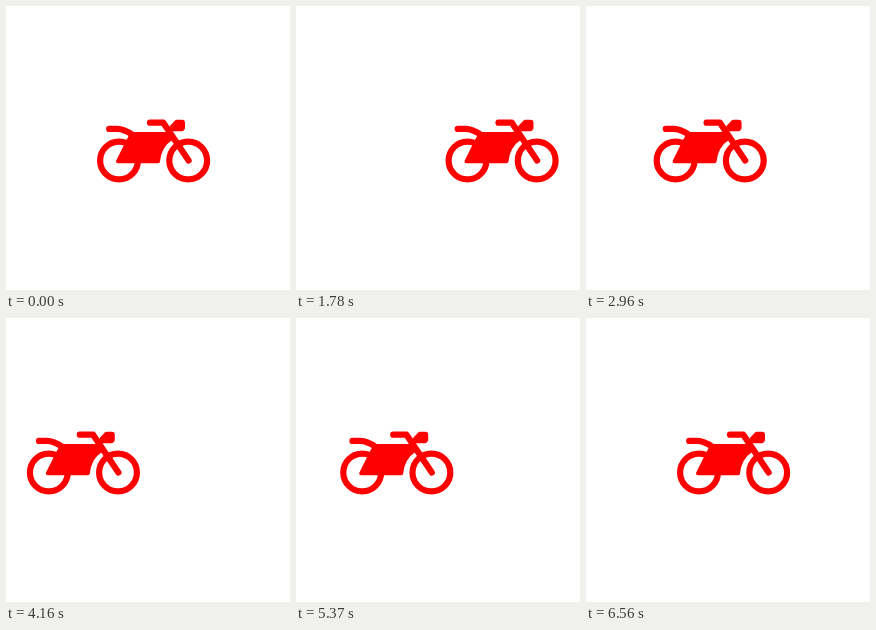
Recreate the animation shown at these times as an HTML page with a canvas. Size 284x284 px, loop 6630 ms.

```html
<!DOCTYPE html>
<html lang="en">
<head>
<meta charset="utf-8">
<title>Motorbike</title>
<style>
html, body { margin: 0; width: 100%; height: 100%; overflow: hidden; background: #fff; }
canvas { display: block; width: 284px; height: 284px; }
</style>
</head>
<body>
<canvas id="stage"></canvas>
<script>
const SIZE = 284, LOOP = 6630, STEP = 11.7, RED = '#ff0000';
const canvas = document.getElementById('stage');
const ratio = window.devicePixelRatio || 1;
canvas.width = canvas.height = Math.round(SIZE * ratio);
const ctx = canvas.getContext('2d');

// Moments at which the bike jumps one step to the right or left.
const hops = [
  [1, [260, 460, 660, 860, 1060, 1190, 1450]],
  [-1, [1580, 1780, 2040, 2240, 2370, 2500, 2700, 2830, 2960,
        3160, 3560, 3760, 4160, 4360, 4490]],
  [1, [4690, 4890, 5020, 5370, 5500, 5700, 6030, 6100, 6300]],
  [-1, [6560]]
];

function offsetAt(time) {
  let steps = 0;
  for (const [dir, times] of hops) {
    steps += dir * times.filter(t => t <= time).length;
  }
  return steps * STEP;
}

function wheel(x) {
  ctx.beginPath();
  ctx.arc(x, 154.5, 18.9, 0, Math.PI * 2);
  ctx.stroke();
}

function shape(d, filled) {
  const path = new Path2D(d);
  if (filled) ctx.fill(path);
  ctx.stroke(path);
}

function drawBike() {
  ctx.strokeStyle = ctx.fillStyle = RED;
  ctx.lineCap = ctx.lineJoin = 'round';
  ctx.lineWidth = 6.2;
  wheel(113);
  wheel(182.2);
  // Seat, then handlebar with fork
  shape('M103.2 122.9 H111 C117 122.9 121 125 126.5 129');
  shape('M144 116.7 H157.3 L182.6 154.5');
  // Body and headlamp
  ctx.lineWidth = 4;
  shape('M126 128 H163 L165.5 132 C157.5 137 153 145 152 155.3 H112 L122.5 134.5 Z', true);
  shape('M165.5 121.2 L170.5 115.8 H176 Q177 115.8 177 117 V122 L176 123.2 H167 Z', true);
}

function render(now) {
  ctx.setTransform(ratio, 0, 0, ratio, 0, 0);
  ctx.fillStyle = '#fff';
  ctx.fillRect(0, 0, SIZE, SIZE);
  ctx.translate(offsetAt(now % LOOP), 0);
  drawBike();
}

const start = performance.now();
function tick() {
  render(performance.now() - start);
  requestAnimationFrame(tick);
}
tick();
</script>
</body>
</html>
```
